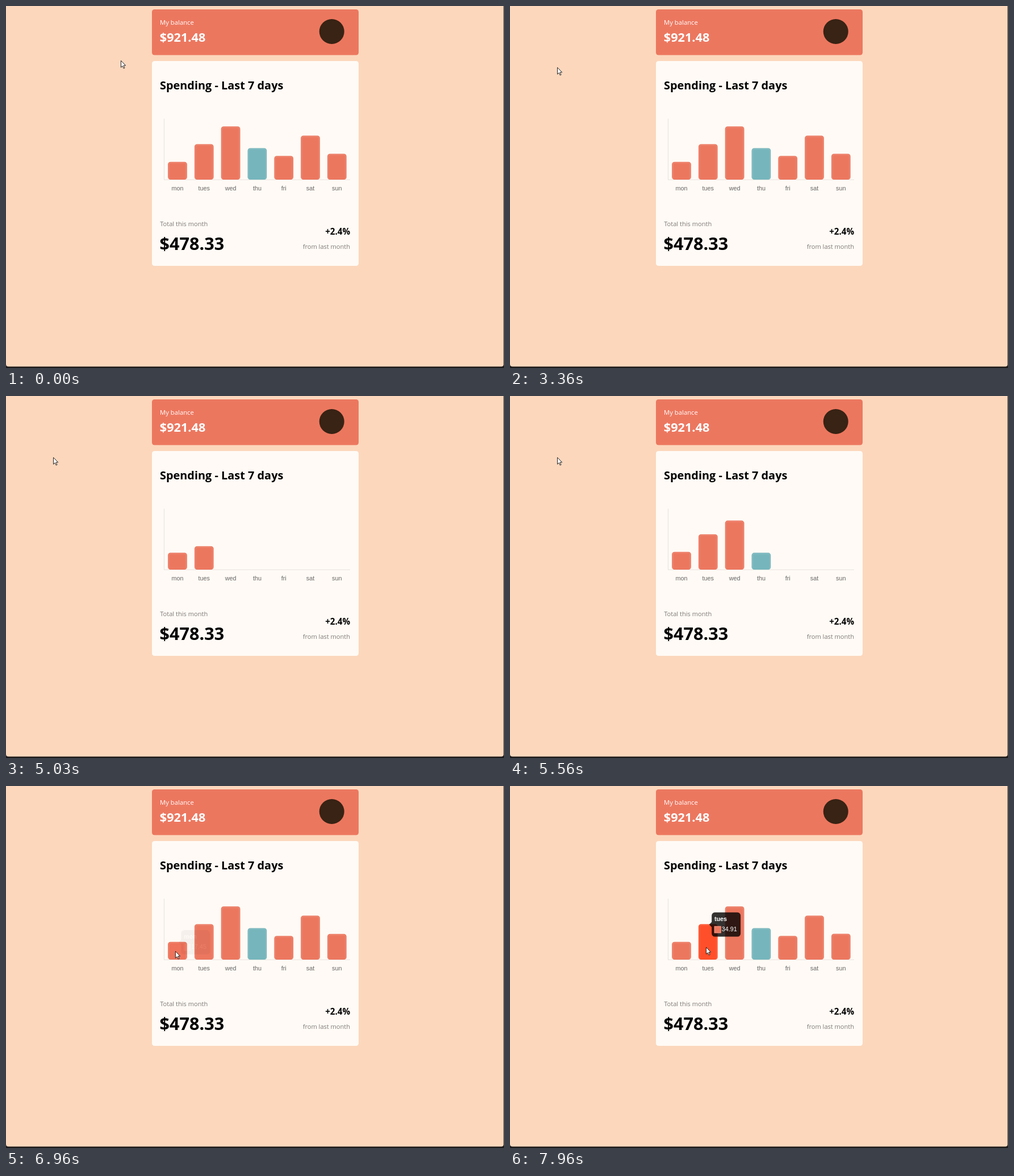
These frames come from a looping animation (877x638 px, 8 s). An HTML page:

```html
<!DOCTYPE html>
<html lang="en">
<head>
<meta charset="utf-8">
<title>Spending chart</title>
<style>
  html, body { margin: 0; width: 100%; height: 100%; overflow: hidden; background: #1d1b1b; }
  svg { display: block; width: 877px; height: 638px; }
  text { font-family: "Open Sans", "Noto Sans", sans-serif; }
  .chart text { font: 10.8px "Liberation Sans", Arial, sans-serif; }
  .days { fill: #666; text-anchor: middle; }
  .semi { font-weight: 650; }
  .bold { font-weight: 700; }
  .note { fill: #7d7a78; }
  .end { text-anchor: end; }
</style>
</head>
<body>
<svg viewBox="0 0 877 638">
  <path d="M0 0H876.3V631.5Q876.3 635.6 872.3 635.6H4.5Q0 635.6 0 631Z" fill="#fcd7bc"/>

  <rect x="257" y="6" width="364" height="80.5" rx="4.5" fill="#ec775f"/>
  <text x="271" y="33.2" font-size="11.3" fill="#fff">My balance</text>
  <text x="270.8" y="63.2" font-size="21.7" fill="#fff" class="bold">$921.48</text>
  <circle cx="573.7" cy="45" r="22" fill="#382314"/>

  <rect x="257" y="97" width="364" height="361" rx="4.5" fill="#fffaf5"/>
  <text x="271" y="147" font-size="19.9" class="semi">Spending - Last 7 days</text>
  <text x="271.2" y="388.2" font-size="11.1" class="note">Total this month</text>
  <text x="270.6" y="430" font-size="30.6" class="bold">$478.33</text>
  <text x="606" y="402.7" font-size="15.1" class="semi end">+2.4%</text>
  <text x="606" y="428.2" font-size="11.05" class="note end">from last month</text>

  <g class="chart">
    <path d="M278.5 198.5V306.5M278 306.2H606" stroke="#e6e2de" fill="none"/>
    <g id="bars"></g>
    <g id="days" class="days"></g>
    <g id="tip" fill="#fff">
      <path d="M4.5 -16a5.4 5.4 0 0 1 5.4 -5.4H50a5.4 5.4 0 0 1 5.4 5.4V16a5.4 5.4 0 0 1 -5.4 5.4H9.9a5.4 5.4 0 0 1 -5.4 -5.4V4.5L0 0L4.5 -4.5Z" fill="#000" fill-opacity=".8"/>
      <text id="tipDay" x="9.2" y="-6.4" style="font-weight:700"></text>
      <rect x="8.8" y="2.6" width="12.4" height="12.6" fill="#ec775f"/>
      <rect x="9.8" y="3.6" width="10.4" height="10.6" fill="none" stroke="#fff" stroke-opacity=".18"/>
      <text id="tipValue" x="22" y="11.8"></text>
    </g>
  </g>

  <path id="cursor" d="M.5 .3V12.2L3.2 9.7L5.2 14L7 13.2L5 8.9H8.7Z" fill="#fff" stroke="#111" stroke-width=".9"/>
</svg>
<script>
const LOOP = 8000, STEP = 1000 / 15;
const BASE = 306, PITCH = 46.8, FIRST = 302, WIDTH = 33.7, SCALE = 1.79;
const GROW = 4499, STAGGER = 298, HOVER = 6957, SWITCH = 7580;
const names = ["mon", "tues", "wed", "thu", "fri", "sat", "sun"];
const values = [17.45, 34.91, 52.36, 31.07, 23.39, 43.28, 25.48];

// time, x, y of the pointer
const path = [
  [433, 202, 96], [500, 194, 97], [767, 88, 107], [833, 83, 108],
  [5767, 83, 108], [5833, 81, 112], [6033, 138, 221], [6100, 171, 266],
  [6167, 197, 282], [6300, 222, 293], [6633, 250, 294], [6900, 284, 292],
  [6967, 298, 291], [7433, 298, 291], [7567, 328, 287], [7700, 342, 284],
  [7800, 345, 284]
];

const $ = id => document.getElementById(id);
const clamp = v => Math.min(1, Math.max(0, v));
const easeOut = v => 1 - (1 - clamp(v)) ** 4;
const mix = (a, b, k) => a + (b - a) * k;
const centre = i => FIRST + i * PITCH;
const topOf = i => BASE - values[i] * SCALE;

function add(parent, tag, attrs) {
  const el = document.createElementNS("http://www.w3.org/2000/svg", tag);
  for (const key in attrs) el.setAttribute(key, attrs[key]);
  return parent.appendChild(el);
}

const bars = names.map((name, i) => {
  const x = centre(i) - WIDTH / 2;
  add($("days"), "text", { x: centre(i), y: 325 }).textContent = name;
  return {
    x,
    body: add($("bars"), "rect", { x, width: WIDTH, rx: 4.5 }),
    seam: add($("bars"), "path", { fill: "none", stroke: "#fff", "stroke-opacity": .17, "stroke-width": .9 })
  };
});

function drawBar(i, t, glow) {
  const { x, body, seam } = bars[i];
  const grown = t < GROW ? 1 : easeOut((t - GROW - i * STAGGER) / 1000);
  const h = values[i] * SCALE * grown, top = BASE - h;
  body.setAttribute("y", top);
  body.setAttribute("height", h);
  body.style.fill = i === 3 ? "#76b5bc" : `color-mix(in srgb, #ff4f2a ${glow * 100}%, #ec775f)`;
  seam.setAttribute("d", h < 8 ? "" :
    `M${x + 1.8} ${BASE - 1}V${top + 4.5}q0 -2.7 2.7 -2.7h${WIDTH - 9}q2.7 0 2.7 2.7V${BASE - 1}`);
}

function pointerAt(t) {
  const next = path.findIndex(p => p[0] > t);
  if (next === 0) return path[0].slice(1);
  if (next < 0) return path[path.length - 1].slice(1);
  const a = path[next - 1], b = path[next];
  const k = (t - a[0]) / (b[0] - a[0]);
  return [mix(a[1], b[1], k), mix(a[2], b[2], k)];
}

function draw(t) {
  const moved = easeOut((t - SWITCH) / 400);
  const glows = [easeOut((t - HOVER) / 400) * (1 - moved), moved];
  names.forEach((_, i) => drawBar(i, t, glows[i] || 0));

  const active = t < SWITCH ? 0 : 1;
  const tipX = centre(0) + 1.9 + PITCH * moved, tipY = mix(topOf(0), topOf(1), moved) + .7;
  $("tip").setAttribute("transform", `translate(${tipX} ${tipY})`);
  $("tip").setAttribute("opacity", clamp((t - HOVER) / 200));
  $("tipDay").textContent = names[active];
  $("tipValue").textContent = values[active];

  $("cursor").setAttribute("transform", `translate(${pointerAt(t)})`);
}

// The picture advances at 15 steps per second.
function tick() {
  const t = performance.now() % LOOP;
  draw(500 + Math.floor((t - 492) / STEP) * STEP);
  requestAnimationFrame(tick);
}
tick();
</script>
</body>
</html>
```
